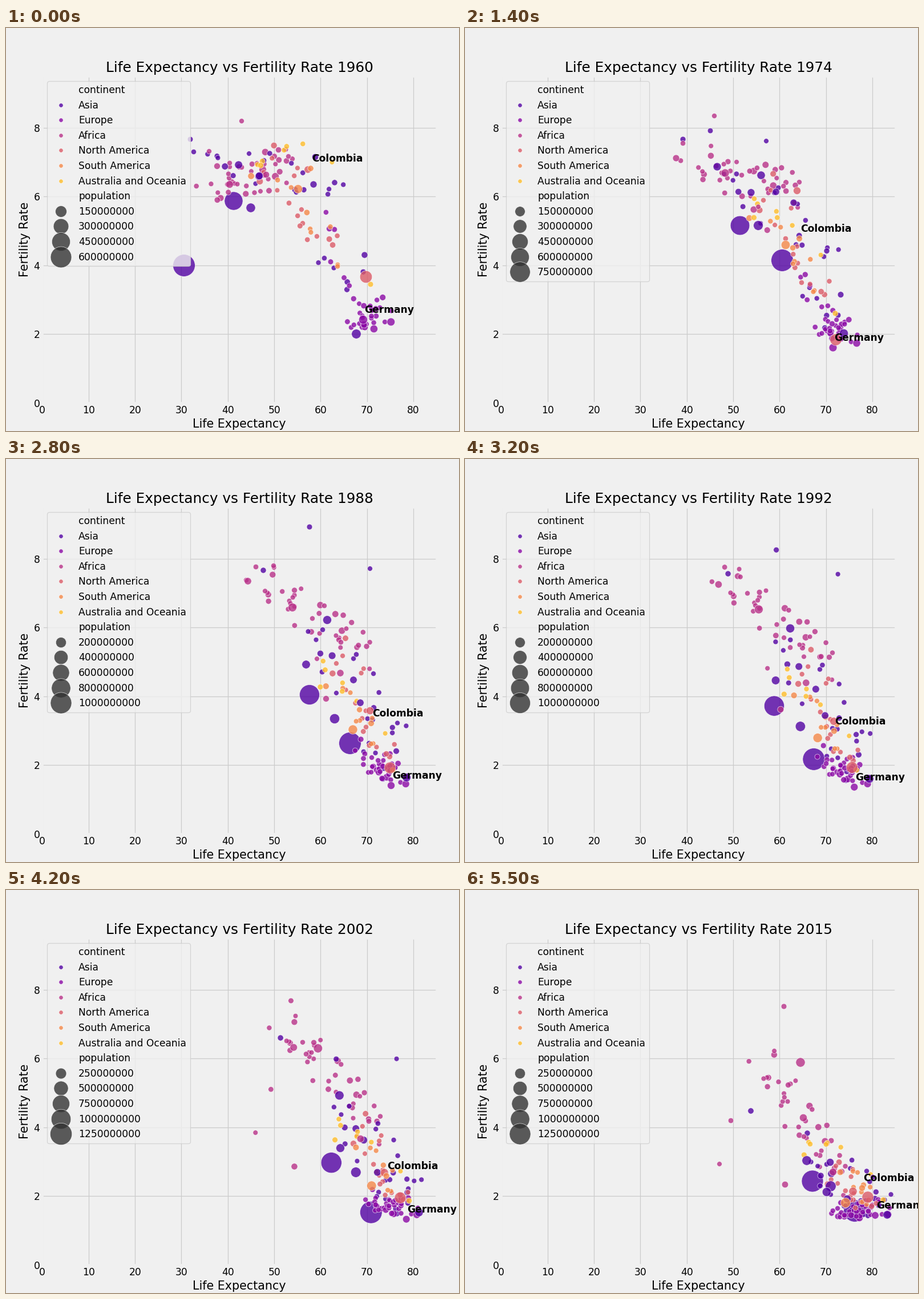
These frames come from a looping animation (794x706 px, 5.6 s). A matplotlib script:

```python
import numpy as np
import matplotlib.pyplot as plt
from matplotlib.animation import FuncAnimation
from matplotlib.lines import Line2D

H, DPI = 706, 88.25
START, FRAMES = 1960, 56
BG = "#f0f0f0"

plt.rcParams.update({
    "font.family": "DejaVu Sans", "font.size": 14,
    "figure.facecolor": BG, "savefig.facecolor": BG,
    "axes.facecolor": BG, "axes.edgecolor": BG, "axes.linewidth": 3,
    "axes.grid": True, "axes.axisbelow": True,
    "axes.titlesize": "x-large", "axes.labelsize": "large",
    "grid.color": "#cbcbcb", "grid.linewidth": 1, "grid.linestyle": "-",
    "xtick.major.size": 0, "ytick.major.size": 0,
})

CONTINENTS = ["Asia", "Europe", "Africa", "North America",
              "South America", "Australia and Oceania"]
COLORS = plt.get_cmap("plasma")(np.linspace(0, 1, 8)[1:-1])
ASIA, EUROPE, AFRICA, NORTH, SOUTH, OCEANIA = range(6)

NOW = START + np.arange(FRAMES)
BAND = (1960, 1988, 2015)
HINGES = (1960, 1974, 1988, 2015)
DIP = (1960, 1988, 2007, 2015)
FULL = (1960, 1974, 1982, 1988, 1997, 2007, 2015)

rng = np.random.default_rng(4)
paths, pops, groups = [], [], []


def glide(years, pts):
    """Monotone cubic path through a few points, sampled once a year."""
    t, p = np.array(years, float), np.array(pts, float)
    h = np.diff(t)
    out = []
    for v in p.T:
        d = np.diff(v) / h
        m = np.zeros(len(t))
        same = d[:-1] * d[1:] > 0
        m[1:-1][same] = 2 / (1 / d[:-1][same] + 1 / d[1:][same])
        for end, near, slope in ((0, 1, d[0]), (-1, -2, d[-1])):
            m[end] = 1.5 * slope - 0.5 * m[near]
        i = np.clip(np.searchsorted(t, NOW, side="right") - 1, 0, len(h) - 1)
        u = (NOW - t[i]) / h[i]
        out.append((1 + 2 * u) * (1 - u) ** 2 * v[i]
                   + u * (1 - u) ** 2 * h[i] * m[i]
                   + u * u * (3 - 2 * u) * v[i + 1]
                   + u * u * (u - 1) * h[i] * m[i + 1])
    return np.stack(out, axis=-1)


def country(group, pop, *xy, years=HINGES):
    """Add a bubble; xy holds stage positions in pixels at the given years."""
    paths.append(glide(years, np.reshape(xy, (-1, 2))))
    pops.append(np.linspace(*pop, FRAMES))
    groups.append(group)
    return len(paths) - 1


def region(group, count, *bands):
    """Scatter countries along a line (x0, y0, x1, y1, spread) that drifts."""
    for rank in (np.arange(count) + 0.5) / count:
        jitter = rng.uniform(-1, 1, 2)
        spots = []
        for x0, y0, x1, y1, spread in bands:
            base = np.array([x0 + (x1 - x0) * rank, y0 + (y1 - y0) * rank])
            spots.append(base + spread * jitter)
        pop = min(rng.lognormal(1.7, 1), 55)
        country(group, (pop, pop * 1.6), *np.ravel(spots), years=BAND)


china = country(
    ASIA, (667, 1371), 312, 416, 330, 458, 465, 211, 540, 319,
    556, 407, 594, 499, 603, 498, 624, 565, 657, 564, 683, 562,
    years=(1960, 1961, 1963, 1970) + FULL[1:])
pops[china] = np.interp(NOW, (1960, 1967, 1974, 1982, 1995, 2000, 2015),
                        (667, 754, 899, 1008, 1205, 1263, 1371))
country(ASIA, (449, 1310), 399, 303, 482, 346, 517, 384, 532, 413,
        555, 456, 586, 495, 609, 510, years=FULL)

region(AFRICA, 38, (360, 270, 500, 240, 38), (438, 200, 645, 345, 30),
       (515, 285, 670, 515, 28))
region(ASIA, 18, (345, 215, 590, 285, 28), (530, 285, 690, 490, 32),
       (610, 470, 732, 545, 32))
region(ASIA, 7, (535, 375, 640, 455, 30), (620, 475, 690, 565, 22),
       (650, 540, 735, 565, 16))
region(EUROPE, 29, (612, 512, 658, 492, 24), (634, 530, 690, 555, 17),
       (645, 565, 735, 555, 14))
region(EUROPE, 7, (565, 300, 595, 490, 18), (615, 500, 660, 520, 18),
       (645, 555, 700, 565, 12))
region(NORTH, 17, (440, 215, 585, 395, 28), (570, 320, 682, 540, 24),
       (635, 485, 720, 560, 20))
region(SOUTH, 9, (440, 240, 605, 420, 28), (570, 385, 655, 500, 20),
       (668, 485, 708, 545, 18))
region(OCEANIA, 7, (410, 255, 565, 215, 24), (525, 360, 655, 470, 26),
       (570, 455, 700, 480, 28))

# Larger countries and those with an uneven course.
country(ASIA, (9, 33), 323, 195, 382, 195, 451, 195, 501, 387)
country(ASIA, (5, 27), 329, 217, 430, 180, 495, 103, 532, 119,
        560, 232, 593, 355, 600, 426, years=FULL)
country(ASIA, (1, 4), 426, 220, 528, 198, 638, 192, 715, 503)
country(ASIA, (88, 258), 429, 315, 514, 346, 576, 455, 641, 519)
country(ASIA, (45, 189), 443, 260, 519, 258, 563, 282, 599, 474)
country(ASIA, (48, 161), 444, 259, 442, 243, 526, 360, 634, 529)
country(ASIA, (26, 101), 542, 226, 576, 306, 609, 387, 640, 477)
country(ASIA, (33, 92), 539, 274, 545, 287, 621, 427, 670, 541)
country(AFRICA, (45, 182), 392, 274, 456, 254, 502, 260, 588, 302)
country(AFRICA, (22, 99), 370, 242, 370, 228, 424, 214, 593, 399)
country(AFRICA, (27, 91), 456, 257, 506, 318, 586, 375, 645, 494)
country(AFRICA, (3, 20), 356, 216, 382, 202, 438, 189, 559, 204)
country(AFRICA, (3, 11), 413, 163, 437, 154, 469, 187, 594, 432)
country(AFRICA, (17, 55), 461, 285, 561, 420, 494, 501, 561, 516, years=DIP)
country(AFRICA, (1, 2), 446, 286, 545, 350, 415, 451, 446, 480, years=DIP)
country(AFRICA, (4, 15), 495, 225, 587, 321, 439, 362, 466, 404, years=DIP)
country(NORTH, (38, 127), 529, 248, 582, 285, 638, 441, 680, 528)
country(SOUTH, (72, 208), 512, 282, 562, 380, 608, 474, 667, 548)
country(OCEANIA, (10, 24), 639, 449, 649, 500, 678, 545, 733, 543)
colombia = country(SOUTH, (16, 48), 534, 246, 586, 369, 624, 432, 640, 463,
                   655, 490, 679, 510, 696, 522, years=FULL)
germany = country(EUROPE, (73, 81), 626, 511, 645, 560, 661, 569, 675, 572,
                  691, 577, 711, 576, 719, 570, years=FULL)
country(ASIA, (93, 127), 614, 536, 664, 535, 702, 558, 740, 569)
country(NORTH, (181, 321), 631, 436, 650, 546, 673, 541, 706, 538)

paths, pops = np.array(paths), np.array(pops)

fig = plt.figure(figsize=(9, 8), dpi=DPI)
ax = fig.add_axes([0.08, 0.07, 0.87, 0.81])
ax.set(xlim=(0, 85), ylim=(0, 9.5), xticks=range(0, 81, 10),
       yticks=range(0, 9, 2), xlabel="Life Expectancy",
       ylabel="Fertility Rate")
title = ax.set_title("")
dots = ax.scatter(np.zeros(len(paths)), np.zeros(len(paths)),
                  c=COLORS[groups], alpha=0.8, edgecolors="w",
                  linewidths=0.57)
tags = {i: ax.text(0, 0, name, weight="bold")
        for i, name in ((colombia, "Colombia"), (germany, "Germany"))}


def area(pop, top):
    return 50 + 950 * pop / top


def key(color, size):
    return Line2D([], [], ls="", marker="o", ms=size, color=color,
                  alpha=0.8, mec="w", mew=0.57)


def draw_legend(top):
    step = next(s for s in (150, 200, 250) if top <= 6 * s)
    ticks = range(step, int(top) + 1, step)
    blank = Line2D([], [], ls="")
    handles = [blank] + [key(c, 6) for c in COLORS] + [blank]
    handles += [key("0.2", area(n, top) ** 0.5) for n in ticks]
    labels = ["continent", *CONTINENTS, "population"]
    labels += [f"{n}000000" for n in ticks]
    ax.legend(handles, labels, loc="upper left")


def update(i):
    top = pops[:, i].max()
    stage = paths[:, i] * (1, -1) + (0, H)
    spots = ax.transData.inverted().transform(stage)
    dots.set_offsets(spots)
    dots.set_sizes(area(pops[:, i], top))
    for n, tag in tags.items():
        tag.set_position(spots[n] + 0.2)
    title.set_text(f"Life Expectancy vs Fertility Rate {START + i}")
    draw_legend(top)
    return []


anim = FuncAnimation(fig, update, frames=FRAMES, interval=100,
                     init_func=lambda: [], repeat=True, repeat_delay=0)
plt.show()
```
